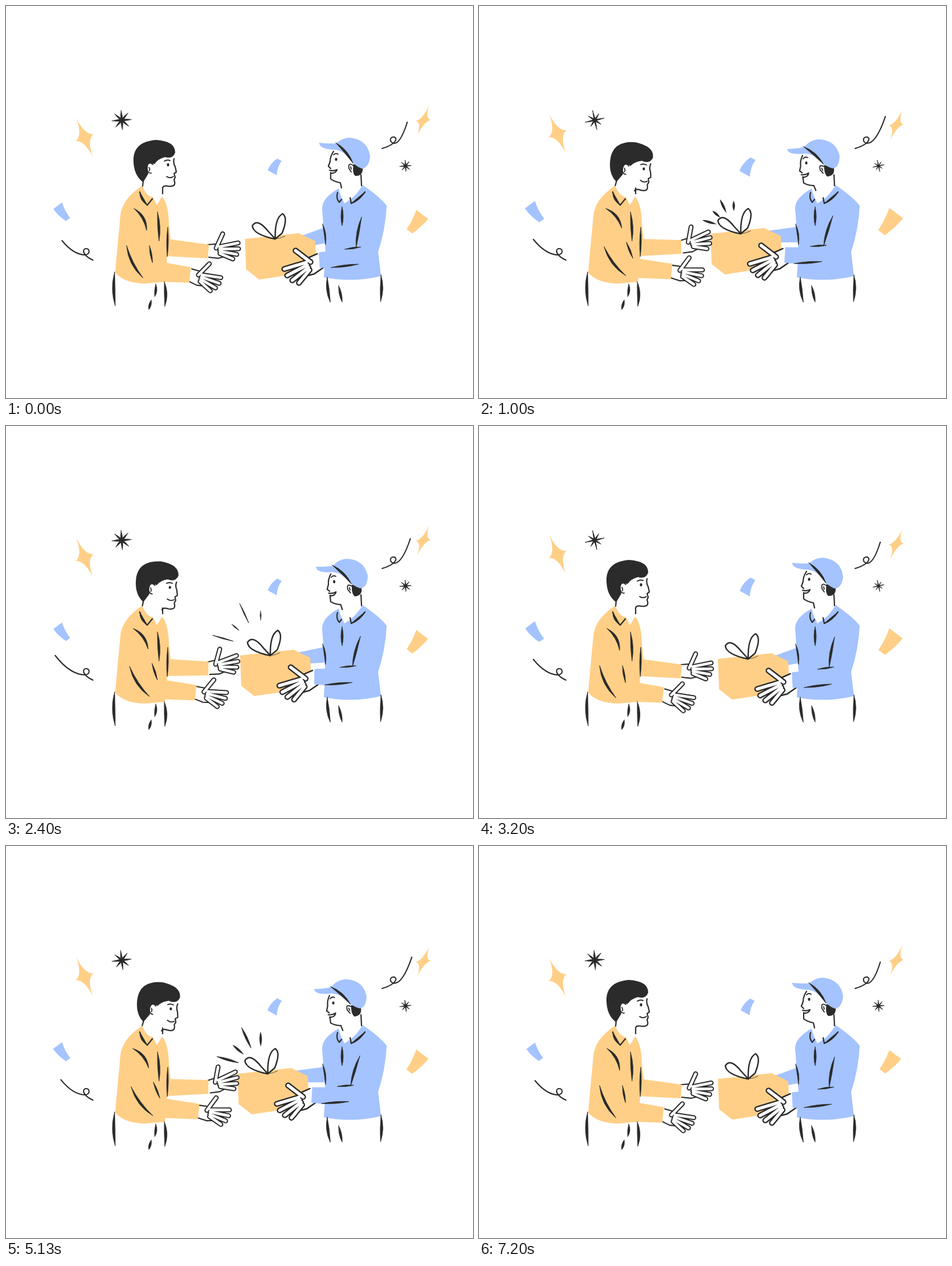
Write an HTML page that moves like this. It is 817x685 px and loops after 7610 ms.

```html
<!DOCTYPE html>
<html lang="en">
<head>
<meta charset="utf-8">
<title>Gift handover</title>
<style>
html, body { margin: 0; width: 100%; height: 100%; overflow: hidden; background: #fff; }
svg { display: block; width: 100%; height: 100%; }
</style>
</head>
<body>
<svg id="stage" viewBox="0 0 817 685"></svg>
<script>
const ORANGE = '#ffcf87', BLUE = '#a4c3ff', INK = '#2b2b2b';
const stage = document.getElementById('stage');

const lerp = (a, b, s) => a + (b - a) * s;
const clamp = v => Math.max(0, Math.min(1, v));
const ease = v => (1 - Math.cos(Math.PI * clamp(v))) / 2;
const polar = (r, degrees) => [r * Math.cos(degrees * Math.PI / 180), r * Math.sin(degrees * Math.PI / 180)];

const fill = (d, color) => `<path d="${d}" fill="${color}"/>`;
const line = (d, w = 2.2, inside = 'none', color = INK) =>
  `<path d="${d}" fill="${inside}" stroke="${color}" stroke-width="${w}" stroke-linecap="round" stroke-linejoin="round"/>`;
const group = (transform, ...parts) => `<g transform="${transform}">${parts.join('')}</g>`;
const dot = (x, y) => `<ellipse cx="${x}" cy="${y}" rx="2.1" ry="2.7" fill="${INK}"/>`;

// Brush mark: thick in the middle, pointed at both ends.
function mark(x, y, length, angle, bend = 0, width = 4) {
  return group(`translate(${x} ${y}) rotate(${angle})`,
    line(`M0 0Q${length / 2} ${bend - width} ${length} 0Q${length / 2} ${bend + width} 0 0Z`, .8, INK));
}

// Sleeve narrowing from one joint to the next.
function limb(x1, y1, w1, x2, y2, w2, color) {
  const angle = Math.atan2(y2 - y1, x2 - x1), nx = -Math.sin(angle) / 2, ny = Math.cos(angle) / 2;
  return fill(`M${x1 + nx * w1} ${y1 + ny * w1}L${x2 + nx * w2} ${y2 + ny * w2}
    L${x2 - nx * w2} ${y2 - ny * w2}L${x1 - nx * w1} ${y1 - ny * w1}Z`, color);
}

// Open hand pointing along +x: four fanned fingers and a raised thumb.
function hand(x, y, angle, size = 1, flip = 1) {
  let digits = `M14 -4L${polar(39, -46)}`;
  for (let i = 0; i < 4; i++) digits += `M20 ${i * 4 - 6}L${polar(54 - i * i, i * 11 - 11)}`;
  return group(`translate(${x} ${y}) scale(${flip * size} ${size}) rotate(${angle})`,
    line('M0 -11L16 -11L28 -6L28 12L16 14L0 11', 2.1, '#fff'),
    line(digits, 8.6), line(digits, 4.6, 'none', '#fff'));
}

// Four-pointed sparkle from its long and short half axes.
function sparkle(cx, cy, ax, ay, bx, by) {
  const tips = [[ax, ay], [bx, by], [-ax, -ay], [-bx, -by]];
  const d = tips.map(([x, y], i) => {
    const [nx, ny] = tips[(i + 1) % 4];
    return `${i ? '' : `M${x} ${y}`}Q${(x + nx) * .12} ${(y + ny) * .12} ${nx} ${ny}`;
  });
  return group(`translate(${cx} ${cy})`, fill(d.join('') + 'Z', ORANGE));
}

// Curved paper strip, wide at one end.
function confetti(cx, cy, length, width, angle, bend, scale, color) {
  const l = length / 2, w = width / 2, n = w * .48, m = (w + n) / 2;
  return group(`translate(${cx} ${cy}) rotate(${angle}) scale(${scale})`,
    fill(`M${-l} ${-w}Q0 ${bend - m} ${l} ${-n}L${l} ${n}Q0 ${bend + m} ${-l} ${w}Z`, color));
}

// Ribbon with a small loop, a long tip and a short tail.
function curl(x, y, flip, tipX, tipY, tailX) {
  return group(`translate(${x} ${y}) scale(${flip} 1)`,
    line(`M${tipX} ${tipY}Q${tipX / 2} 6 0 6C9 4 8 -6 0 -5C-7 -3 -3 8 ${tailX} 15`, 2.1));
}

function asterisk(cx, cy, r, thin) {
  let arms = '';
  for (let i = 0; i < 4; i++) {
    const reach = r * (i % 2 ? lerp(.95, .75, thin) : 1);
    arms += group(`rotate(${i * 45 - 4 - 9 * thin})`, mark(-reach, 0, 2 * reach, 0, 0, r * lerp(.2, .15, thin)));
  }
  return group(`translate(${cx} ${cy})`, arms);
}

function decorations(t) {
  const pulse = (1 - Math.cos(t / 2400 * 2 * Math.PI)) / 2;
  const thin = ease(t % 2400 / 900) - ease((t % 2400 - 900) / 550);
  const a = t % 1800, b = t % 3600;
  const left = ease(a / 600) - .75 * ease((a - 600) / 400) - .25 * ease((a - 1400) / 400);
  const right = ease(b / 800) - .25 * ease((b - 800) / 1600) - .75 * ease((b - 2250) / 500);
  const grown = 1 + .17 * pulse;
  return [
    sparkle(137.5, 230 - 7.3 * pulse, -14.5, -34, 15.5, -6),
    sparkle(730, 200 + 8.5 * pulse, 10.5, -26.5, 13, -1),
    confetti(99.5, 361, 30, 19, 53, 3, grown, BLUE),
    confetti(472, 280, 26, 18, -61, -4, grown, BLUE),
    confetti(717, 379, 37, 26, 127, -2.5, grown, ORANGE),
    asterisk(202.5, 199.5, 17, thin),
    asterisk(699, 279.5, 10, thin),
    curl(139, 429, 1, -41 - 12 * left, -19 - 9 * left, 13),
    curl(679, 234, -1, -23 - 9 * right, -31 - 10 * right, 21)
  ].join('');
}

// Burst beside the bow: four strokes evenly fanned, long and short in turn.
function rays(t) {
  const grow = clamp((t - 850) / 400), fade = clamp((t - 2200) / 400);
  if (!grow || fade === 1) return '';
  const inner = 33 + 16 * clamp((t - 1000) / 300) + 4 * fade;
  let strokes = '';
  for (let i = 0; i < 4; i++) {
    const outer = lerp(33, i % 2 ? 75 : 96, grow) - 16 * fade;
    const angle = 196 + 24.5 * i, [x, y] = polar(inner, angle);
    strokes += mark(446 + x, 390 + y, outer - inner, angle, 0, 3.6 * (1 - fade));
  }
  return strokes;
}

function receiver(s) {
  const head = group(`rotate(${9.5 * s} 243 310)`,
    fill('M240 308Q222 295 223 266Q225 237 262 234Q296 236 296 256Q292 268 278 264Q266 267 260 276L254 275Q245 274 249 293Z', INK),
    line('M257 277Q248 270 246 280Q247 293 254 292M250 282Q252 285 251 288', 1.8),
    line('M240 306L239 315M294 267Q292 274 296 281L298 290L294 293L296 299L294 304Q299 316 285 315Q275 313 274 318'),
    line('M277 271Q282 268 287 270M281 298Q287 302 293 298', 1.9),
    dot(283.5, 277.5));

  return [
    head,
    line('M274 318V328'),
    fill('M238 314Q202 338 200 368Q194 430 191 466Q208 485 244 485L278 482L282 438L288 408L285 380Q284 345 273 333L264 348L257 334Q246 333 238 314Z', ORANGE),
    hand(354, 428 - 7 * s, -4 - 14 * s),
    hand(322 + 15 * s, 470 - 6 * s, 16 - 8 * s),
    limb(281, 422, 30, 354, 429 - 8 * s, 24, ORANGE),
    limb(274, 465 - 7 * s, 34, 322 + 15 * s, 470 - 6 * s, 27, ORANGE),
    line('M234 325Q238 340 247 348L256 337'),
    mark(234, 325, 26, 60, 4),
    mark(224 - 2 * s, 354, 44, 60 - 9 * s, -11),
    mark(265, 360, 51, 87, -2),
    mark(283, 387, 51, 91, 0, 3),
    mark(211 + 8 * s, 419 + 2 * s, 63, 63 - 10 * s, 9),
    mark(251 + 7 * s, 419 - 6 * s, 30, 80 - 12 * s, 0, 3),
    mark(190, 465, 59, 89, 4, 4.8),
    mark(277, 482, 43, 89, -4, 4.8),
    mark(262, 486, 22, 95, -2),
    mark(254, 514, 17, 104)
  ].join('');
}

function courier(s, t) {
  const dx = -13 * s, dy = -9 * s;
  const gift = group(`translate(${dx} ${dy})`,
    fill('M418 407L512 397L541 411L543 463L443 478L420 460Z', ORANGE),
    line('M470 407Q432 399 431 384Q440 370 459 394L471 407', 2.5, '#fff'),
    line('M471 407Q470 370 484 363Q494 370 483 397L471 407', 2.5, '#fff'),
    line('M456 404Q471 411 488 402', .8));

  const head = group(`rotate(${-8.4 * s} 618 305)`,
    line('M573 254Q567 263 567 272L564 280L568 284M568 291L568 302Q574 307 585 309L587 318'),
    fill('M608 276L624 283Q625 297 611 297Q605 292 608 276Z', INK),
    line('M608 279Q598 272 600 284L604 290M603 281L604 285', 1.9),
    line('M573 260Q577 256 581 259', 1.9),
    dot(577.5, 268),
    line('M566 287Q573 289 579 286Q577 293 568 292'),
    fill('M548 239Q566 241 578 240Q588 230 602 230Q634 234 637 264Q634 284 622 284Q610 280 597 262Q584 250 571 251Q548 249 548 239Z', BLUE),
    mark(577, 239, 47, 50, -5));

  return [
    limb(565, 399, 28, 518 + dx, 412 + dy, 20, BLUE),
    gift, rays(t), head,
    line('M621 295L622 314'),
    fill('M582 319Q553 335 553 354L559 430L556 474Q605 484 656 472L651 430Q664 390 666 349Q656 335 624 313Q612 332 601 339L592 345L585 330Z', BLUE),
    hand(550 + dx, 445 + dy, 24, 1.2, -1),
    limb(620, 440, 36, 548 + dx, 444 + dy, 27, BLUE),
    line('M580 326Q577 336 583 343L587 338M602 335L604 345Q618 339 628 325'),
    mark(604, 345, 31, -40, 3, 3.4),
    mark(588, 351, 33, 90),
    mark(554, 381, 36, 82, -3, 2.6),
    mark(622 - 3 * s, 369 - 2 * s, 55, 100 + 7 * s, 3),
    mark(593 + dx, 425 - 5 * s, 28, 4 * s - 8, 0, 2.8),
    mark(569 - 17 * s, 457 - 7 * s, 48, 3 * s - 7, 0, 3.2),
    mark(562, 474, 44, 83, 3, 4.6),
    mark(582, 489, 29, 78),
    mark(656, 470, 47, 91, -3, 4.6)
  ].join('');
}

// Twenty poses a second in blocks of sixteen; the last pose rests until the loop restarts.
function poseTime(ms) {
  if (ms >= 7200) return 7200;
  const within = ms % 800;
  const step = within < 30 ? 0 : Math.min(15, Math.floor((within + 20) / 50));
  return ms - within + step * 50;
}

function draw(now) {
  const t = poseTime(now % 7610), cycle = t % 4000;
  const reach = ease(cycle / 1000) - ease((cycle - 2000) / 1000);
  stage.innerHTML = decorations(t) + courier(reach, cycle) + receiver(reach);
  requestAnimationFrame(draw);
}
draw(0);
</script>
</body>
</html>
```
